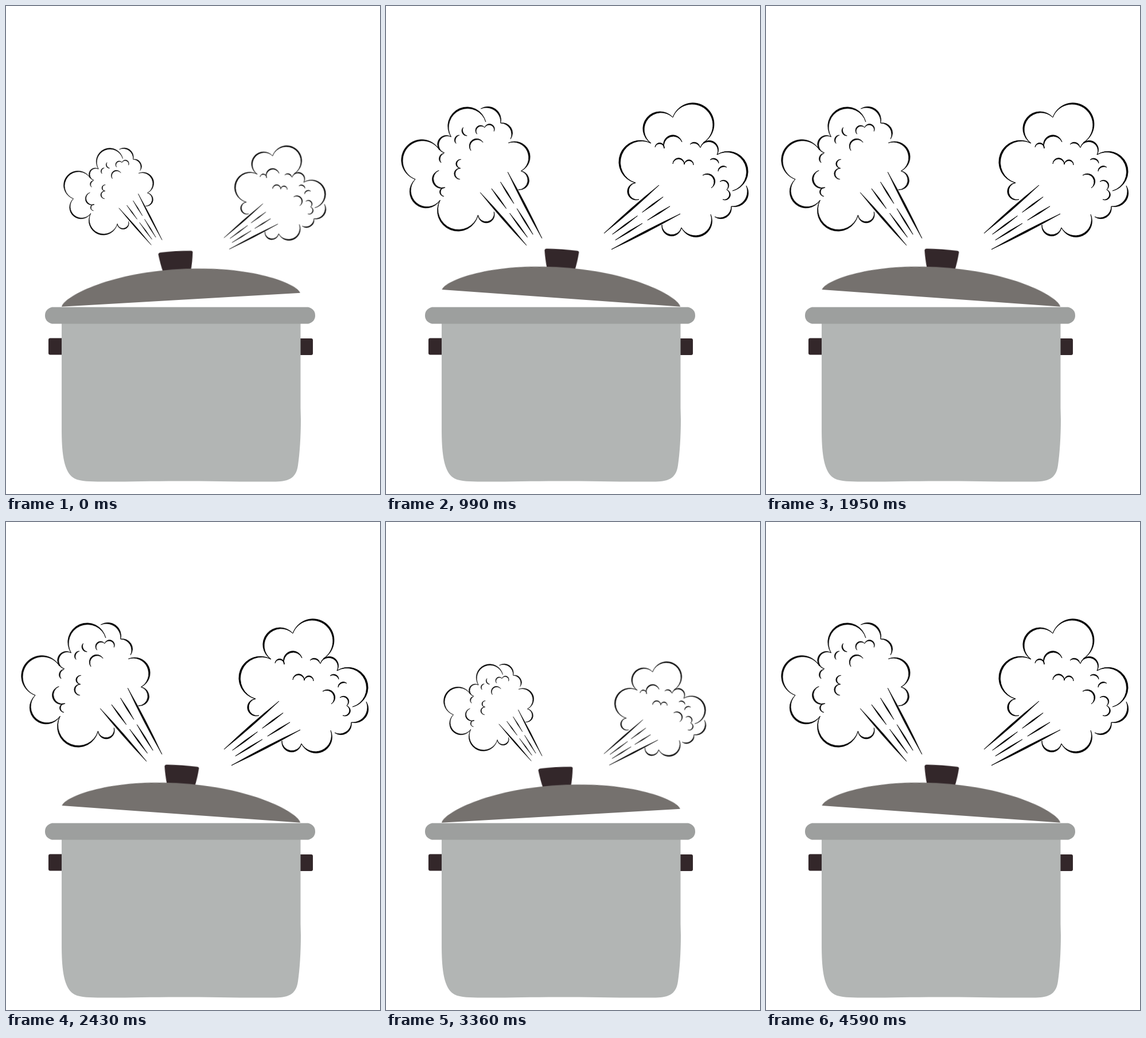
Animation of 652 by 850 pixels, one loop 4.62 s. Source, as an HTML page:

```html
<!DOCTYPE html>
<html lang="en">
<head>
<meta charset="utf-8">
<title>Boiling pot</title>
<style>
  html, body { margin: 0; width: 100%; height: 100%; overflow: hidden; background: #fff; }
  svg { display: block; width: 652px; height: 850px; }
  .lid, .steam { transform-origin: 0 0; animation: 60ms step-end infinite; }
  .lid { animation-name: rattle; }
  .left { animation-name: puff-left; }
  .right { animation-name: puff-right; }
  @keyframes rattle {
    0%, 100% { transform: translate(97px, 523.7px) rotate(-3.3deg) translate(-97px, -524px); }
    50% { transform: translate(513px, 523.7px) rotate(4.1deg) translate(-513.5px, -524px); }
  }
  @keyframes puff-left {
    0%, 100% { transform: translate(81.8px, 124.4px) scale(.7); }
    50% { transform: none; }
  }
  @keyframes puff-right {
    0%, 100% { transform: translate(111.8px, 124.1px) scale(.706); }
    50% { transform: none; }
  }
</style>
</head>
<body>
<svg viewBox="0 0 652 850">
  <defs>
    <path id="cloud" stroke="#000" stroke-width=".8" stroke-linejoin="round"/>
  </defs>

  <g class="steam left"><use href="#cloud" transform="matrix(0 -.96 .96 0 -135.2 781.8)"/></g>
  <g class="steam right"><use href="#cloud"/></g>

  <g class="lid">
    <path fill="#33272a" d="M270.500 443Q270.500 440 275 439.700Q301 438.500 327 439.700Q331 440 330.500 443Q329 460 325.500 474H277Q273 460 270.500 443Z"/>
    <path fill="#75716e" d="M97 524C101 508 178 470.500 305 470.500S509.500 508 513.500 524Z"/>
  </g>

  <g fill="#33272a">
    <rect x="74" y="578.500" width="30" height="29" rx="3"/>
    <rect x="505" y="579" width="30" height="29" rx="3"/>
  </g>
  <path fill="#b2b5b4" d="M97 550H513.500V700L514 720C514 750 512 780 509 800C506 821 495 828 470 828.500C410 829 360 827.500 300 827.500C245 827.500 205 829 160 828.500C140 828 125 828 115 820C100 807 97 775 97 735Z"/>
  <path fill="#9d9f9e" d="M80 524.500H527Q539 528 539 539T527 553.500H80Q68 550 68 539T80 524.500Z"/>
</svg>
<script>
  const lerp = (a, b, t) => a + (b - a) * t;
  const mix = (p, q, t) => [lerp(p[0], q[0], t), lerp(p[1], q[1], t)];
  const span = ([x0, y0], [x1, y1]) => Math.hypot(x1 - x0, y1 - y0);

  const arc = (chord, bulge, sweep, end) => {
    const r = (chord * chord / 4 + bulge * bulge) / (2 * bulge);
    return `A${r} ${r} 0 ${+(bulge > chord / 2)} ${sweep} ${end}`;
  };

  // A crescent: out along one arc, back along a flatter one.
  const crescent = (p, q, round) => {
    const chord = span(p, q), bulge = chord * round;
    const weight = Math.min(2.8, 1 + chord / 25, bulge / 2);
    return `M${p}` + arc(chord, bulge, 1, q) + arc(chord, bulge - weight, 0, p) + 'Z';
  };

  // Crescents from cusp to cusp, all equally round.
  const scallops = (round, cusps) => {
    const pts = cusps.split(' ').map(p => p.split(',').map(Number));
    return pts.slice(1).map((q, i) => crescent(pts[i], q, round)).join('');
  };

  // A line that is thickest in the middle.
  const sliver = (p, q, weight) => {
    const len = span(p, q), [mx, my] = mix(p, q, .5);
    const nx = (p[1] - q[1]) / len * weight, ny = (q[0] - p[0]) / len * weight;
    return `M${p}Q${mx + nx} ${my + ny} ${q}Q${mx - nx} ${my - ny} ${p}Z`;
  };

  // A fan of jets; the inner ones are broken in two.
  const jets = (n) => {
    let d = '';
    for (let i = 0; i < n; i++) {
      const f = i / (n - 1), inner = f > 0 && f < 1;
      const from = mix([380, 396], [393, 424], f), to = mix([476, 312], [513, 362], f);
      const parts = inner ? [[.1, .52], [.6, .95]] : [[0, 1]];
      for (const [a, b] of parts) {
        d += sliver(mix(from, to, a), mix(from, to, b), inner ? 2 : 3);
      }
    }
    return d;
  };

  document.getElementById('cloud').setAttribute('d', [
    scallops(.73, '500,194 553,238'),
    scallops(.58, '441,337 435,308 462,239 500,194'),
    scallops(.6, '548,247 577,259 604,322'),
    scallops(.5, '566,363 515,386 481,381'),
    scallops(.34, '628,313 602,349 573,367'),
    scallops(.54, '469,246 485,248 516,237'),
    scallops(.54, '500,275 520,276 536,277'),
    scallops(.54, '552,295 567,317'),
    scallops(.54, '582,306 594,320 587,337'),
    scallops(.34, '530,241 547,246'),
    scallops(.34, '565,268 580,274'),
    scallops(.34, '579,288 594,281'),
    jets(4)
  ].join(''));
</script>
</body>
</html>
```
